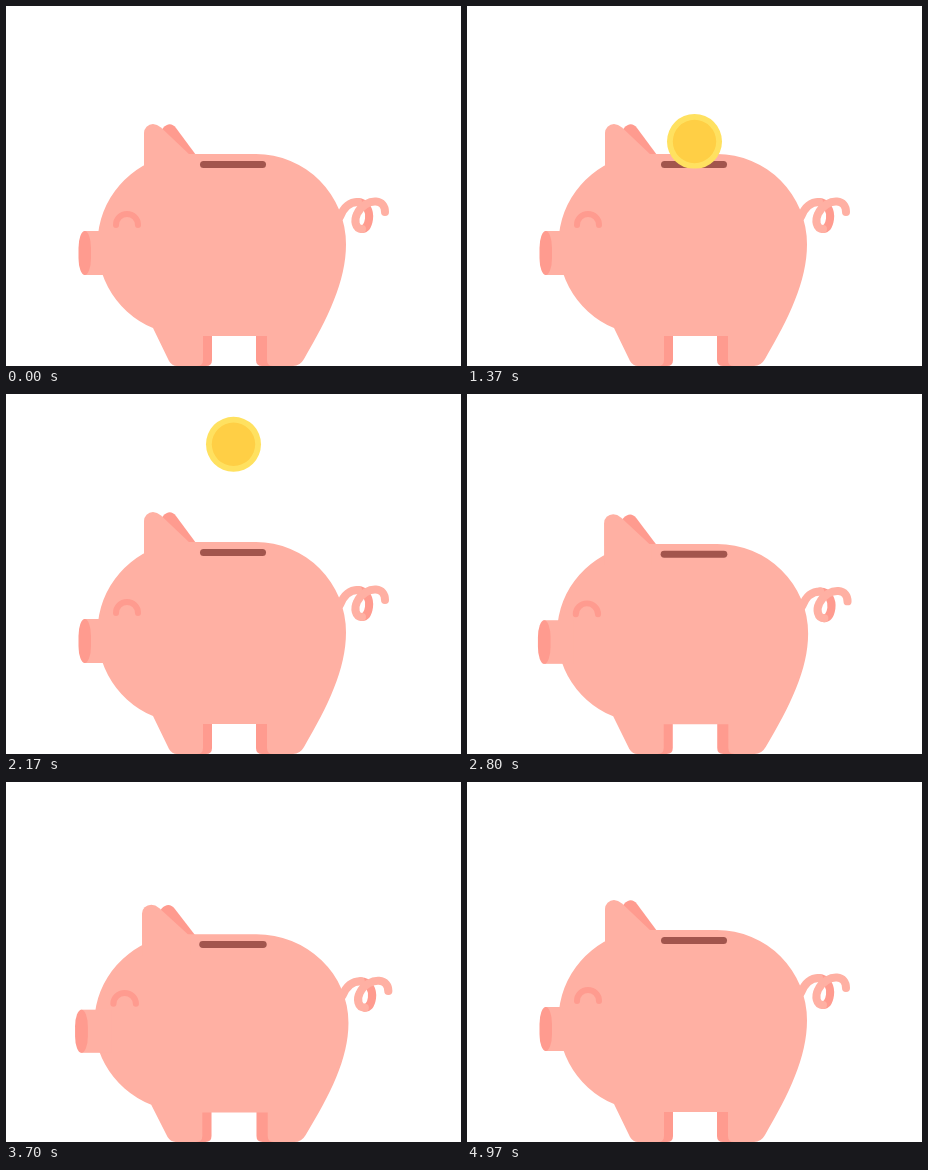
Recreate the animation shown at these times as an HTML page. Size 455 by 360 pixels, loop 5070 ms.

```html
<!DOCTYPE html>
<html lang="en">
<head>
<meta charset="utf-8">
<title>Piggy bank</title>
<style>
  html, body { margin: 0; width: 100%; height: 100%; overflow: hidden; background: #fff; }
  svg { display: block; width: 455px; height: 360px; }
  .skin { fill: #ffb0a3; }
  .shade { fill: #ff9b8f; }
  .line { fill: none; stroke-linecap: round; }
  .tail { stroke: #ffb0a3; stroke-width: 8; }
  .tail.back { stroke: #ff9b8f; }
  .eye { stroke: #ff9b8f; stroke-width: 6; }
  .slot { stroke: #a2554d; stroke-width: 7; }
</style>
</head>
<body>
<svg viewBox="0 0 455 360">
  <clipPath id="aboveSlot"><rect width="455" height="162.5"/></clipPath>

  <g id="pig">
    <path class="line tail back" d="M352 196C360 196 364 205 363 213C362 220 359 223 356 223"/>
    <path class="line tail" d="M334 211C338 200 345 196 352 196"/>
    <path class="line tail" d="M356 223C349 223 348 214 351 208C355 199 364 195 370 195.500C376 196 379 200 379 206"/>

    <path class="shade" d="M152 130L157 122Q164 114.500 170 122L190 149V160Z"/>
    <path class="shade" d="M190 325H206V354Q206 360 200 360H190Z"/>
    <path class="shade" d="M270 325H250V354Q250 360 256 360H270Z"/>

    <path class="skin" d="M182 148H250A90 90.500 0 0 1 340 238.500C340 275 322 312 298 353Q294 360 287 360H267Q261 360 261 354V330H197V354Q197 360 191 360H171Q166 360 163 355L147 322A90.500 90.500 0 0 1 182 148Z"/>
    <path class="skin" d="M138 170V127A9 9 0 0 1 147 118Q151 118 155 121.500L185 150V170Z"/>

    <rect class="skin" x="78" y="225" width="30" height="44"/>
    <rect class="shade" x="72.500" y="225" width="12.500" height="44" rx="6.250" ry="17"/>

    <path class="line eye" d="M110 219a11 11 0 0 1 22 0"/>
    <path class="line slot" d="M197.500 158.500H256.500"/>
  </g>

  <g clip-path="url(#aboveSlot)">
    <g id="coin" visibility="hidden">
      <circle r="27.500" fill="#ffe160"/>
      <circle r="21.700" fill="#ffcf45"/>
    </g>
  </g>
</svg>

<script>
  const LOOP = 5070, GROUND = 360, MID = 228;
  const pig = document.getElementById('pig');
  const coin = document.getElementById('coin');

  // Half-sine hump between two poses
  const hump = (p, from, to, height) =>
    p > from && p < to ? height * Math.sin(Math.PI * (p - from) / (to - from)) : 0;

  // Poses advance at 12.5 per second, aligned to a 30 Hz clock
  const poseAt = t => Math.floor(Math.floor((t + 4) * 0.03) * 5 / 12);

  function draw(now) {
    const pose = poseAt(now % LOOP);
    const p = (pose + 10) % 12;
    const falling = pose > 2 && p >= 1 && p <= 4;

    coin.setAttribute('visibility', falling ? 'visible' : 'hidden');
    coin.setAttribute('transform', `translate(227.5 ${50.3 + 21.3 * (p - 1) ** 2})`);

    // A hard squash when the coin lands, then a softer bounce
    const q = hump(p, 3.55, 6.3, 0.048) + hump(p, 6.5, 9.45, 0.022);
    pig.setAttribute('transform',
      `translate(${MID} ${GROUND}) scale(${1 + q} ${1 - 0.9 * q}) translate(${-MID} ${-GROUND})`);
  }

  function tick() {
    draw(performance.now());
    requestAnimationFrame(tick);
  }
  tick();
</script>
</body>
</html>
```
